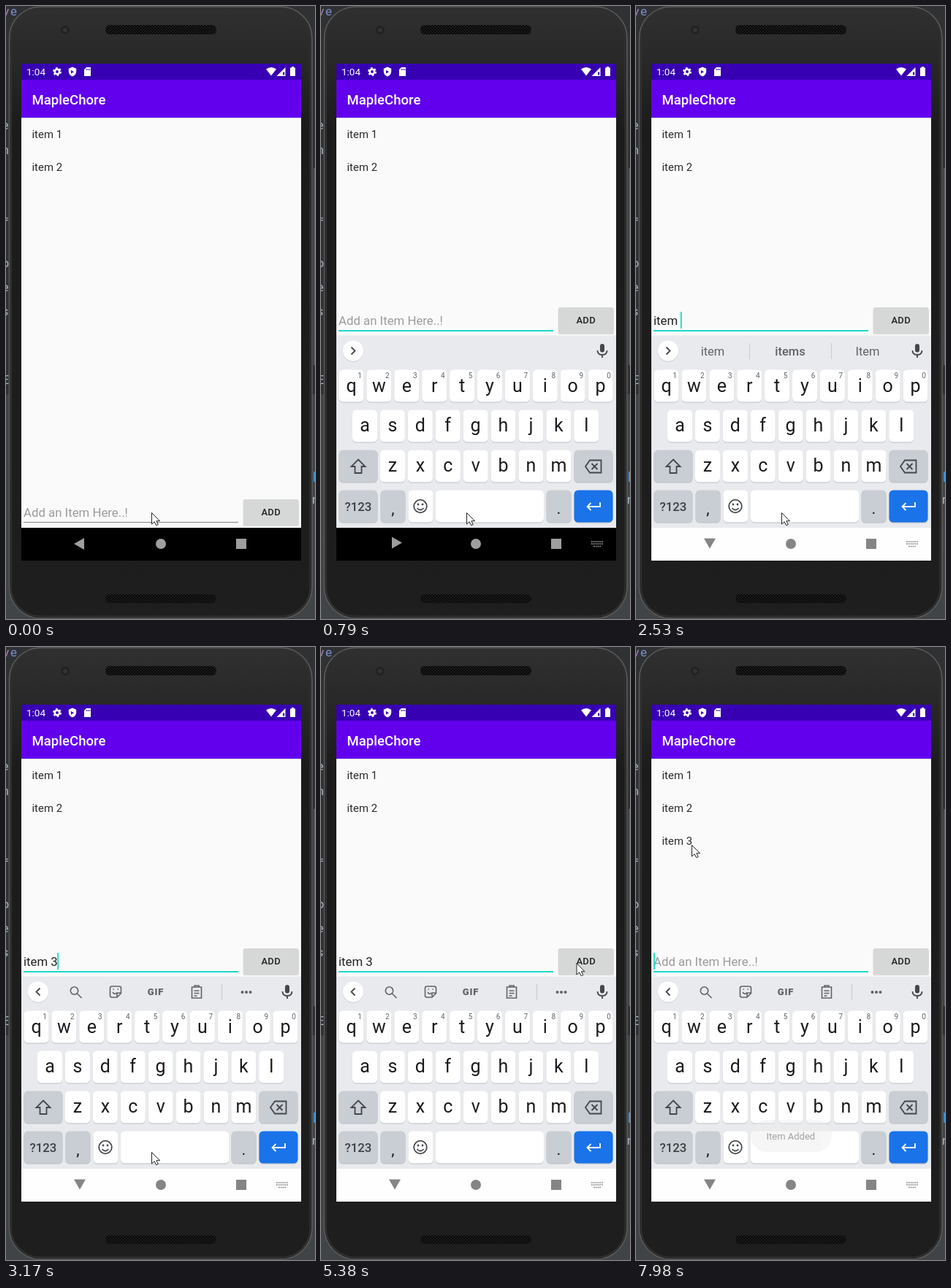
Recreate the animation shown at these times as an HTML page. Size 423x840 px, loop 8 s.

```html
<!DOCTYPE html>
<html lang="en">
<head>
<meta charset="utf-8">
<title>To-do list demo</title>
<style>
html, body { margin: 0; width: 100%; height: 100%; overflow: hidden; background: #2b2b2b; }
svg { display: block; width: 100vw; height: 100vh; }
text { font-family: Roboto, sans-serif; white-space: pre; }
.medium { font-weight: 500; }
.mid { text-anchor: middle; }
.line { fill: none; stroke: #44474b; stroke-width: 1.8; }
#tools { stroke: #5f6368; stroke-width: 1.6; }
.code { font: 17px "Noto Sans Mono", monospace; fill: #a9b7c6; }
</style>
</head>
<body>
<svg viewBox="0 0 423 840">
  <defs>
    <linearGradient id="shell" x2="0" y2="1">
      <stop offset="0" stop-color="#303030"/>
      <stop offset=".09" stop-color="#282828"/>
      <stop offset=".2" stop-color="#1b1b1b"/>
      <stop offset="1" stop-color="#1e1e1e"/>
    </linearGradient>
    <pattern id="mesh" width="4" height="4" patternUnits="userSpaceOnUse">
      <rect width="4" height="4" fill="#0d0d0d"/>
      <path d="M0 0h1v1h-1zM2 2h1v1h-1z" fill="#333"/>
    </pattern>
    <clipPath id="content"><path d="M21 153H404V715H21z"/></clipPath>
  </defs>

  <!-- desktop behind the phone -->
  <path d="M0 0H423V840H0z" fill="#2f3133"/>
  <path d="M0 532H423V840H0z" fill="#414446"/>
  <g id="code" class="code"></g>
  <path d="M421 638h2v14h-2z" fill="#3d8fd1"/>
  <path d="M421 222h2v270h-2z" fill="#55585a"/>

  <!-- phone -->
  <rect x="4.500" y="1" width="414.500" height="838" rx="43" fill="url(#shell)" stroke="#5c5c5c" stroke-width="1.500"/>
  <rect x="7" y="3.500" width="409.500" height="833" rx="40" fill="none" stroke="#303030" stroke-width="2"/>
  <circle cx="81" cy="33" r="6" fill="#222"/><circle cx="81" cy="33" r="3" fill="#333"/>
  <rect x="136" y="26" width="152" height="13" rx="6" fill="url(#mesh)"/>
  <rect x="136" y="806" width="152" height="12" rx="6" fill="url(#mesh)"/>

  <!-- bars -->
  <path d="M21 80H404V760H21z" fill="#fafafa"/>
  <path d="M21 79H404V101H21z" fill="#3700b3"/>
  <path d="M21 101H404V153H21z" fill="#6200ee"/>
  <path d="M21 153H404V154H21z" fill="#ddd"/>
  <g fill="#fff">
    <text x="28" y="95" font-size="13.500">1:04</text>
    <circle cx="70" cy="90" r="3.200" fill="none" stroke="#fff" stroke-width="2.600"/>
    <circle cx="70" cy="90" r="5" fill="none" stroke="#fff" stroke-width="2" stroke-dasharray="2.6 2.636"/>
    <path d="M91 83.5l5.2 2.2v4c0 3.400-2.200 5.600-5.200 6.800c-3-1.200-5.200-3.400-5.200-6.800v-4z"/>
    <path d="M89 88l4 2.200l-4 2.200z" fill="#3700b3"/>
    <path d="M110 84h6v12h-9v-9z"/>
    <path d="M110.500 86v2M112.500 86v2M114.500 86v2" stroke="#3700b3"/>
    <path d="M356 86.500q7-5 14 0l-7 9z"/>
    <path d="M382.500 84v12h-12z"/>
    <path d="M379 90.500h2.200v4h-2.200z" fill="#3700b3"/>
    <path d="M389 84.500h2v-1.500h3v1.500h2v11.500h-7z"/>
    <text x="35.500" y="134.500" font-size="18.600" class="medium">MapleChore</text>
  </g>

  <g font-size="14.900" fill="#2a2a2a">
    <text x="35.500" y="181">item 1</text>
    <text x="35.500" y="226">item 2</text>
    <text x="35.500" y="271" id="newItem">item 3</text>
  </g>

  <g id="entry">
    <text id="hint" x="24" y="700" font-size="16.800" fill="#9b9b9b">Add an Item Here..!</text>
    <text id="typed" x="24" y="700" font-size="16.800" fill="#212121"></text>
    <rect id="composing" x="24" y="701.500" height="1" fill="#333"/>
    <rect id="rule" x="24" width="294"/>
    <rect id="caret" y="682" width="1.800" height="23" fill="#1bd9c8"/>
    <rect x="324.500" y="677" width="76.500" height="36" rx="2" fill="#000" opacity=".13"/>
    <rect id="button" x="325" y="676" width="75" height="35" rx="2"/>
    <text x="362.700" y="697.500" font-size="13" letter-spacing=".3" fill="#222" class="medium mid">ADD</text>
  </g>

  <g clip-path="url(#content)">
    <g id="keyboard">
      <path d="M21 451.500H404V716H21z" fill="#e8eaed"/>
      <g id="keys"></g>
      <circle cx="44" cy="473.500" r="14.300" fill="#d3d5d8"/>
      <circle cx="44" cy="472.500" r="14" fill="#fff"/>
      <path id="chevron" class="line" d="M41.500 467.500l5 5l-5 5"/>
      <!-- microphone -->
      <rect x="382" y="463" width="6" height="11.500" rx="3" fill="#44474b"/>
      <path class="line" d="M378.500 472q0 6 6.500 6t6.500-6M385 478v4"/>
      <g id="words" font-size="16.500" fill="#5f6368">
        <path d="M155.500 462v22M267.500 462v22" stroke="#c9ccd0"/>
        <text class="mid" x="105" y="479"></text>
        <text class="mid medium" x="211" y="479"></text>
        <text class="mid" x="317" y="479"></text>
      </g>
      <g id="tools" class="line">
        <circle cx="93.500" cy="471" r="5.200"/><path d="M97.500 475l6 6"/>
        <path d="M145 465h10q2.500 0 2.500 2.500v7l-5.500 5.500h-7q-2.500 0-2.500-2.500v-10q0-2.500 2.500-2.500zM157 474h-5v5M146 473q2.500 4 5 1M146.500 469h1.500M152.500 469h1.500"/>
        <text class="mid" x="205" y="477" font-size="13" font-weight="900" letter-spacing=".8" fill="#5f6368" stroke="none">GIF</text>
        <path d="M254.500 466h13v15h-13zM258 466v-2h6v2zM257.500 471h7M257.500 474.500h7M257.500 478h4"/>
        <path d="M295.500 462v21" stroke="#cfd2d5"/>
        <path d="M323.500 473h.01M329 473h.01M334.500 473h.01" stroke-width="4" stroke-linecap="round"/>
      </g>
      <path class="line" d="M51 621.500l9.500 9.500h-5v9h-9v-9h-5z"/>
      <path class="line" d="M368 622.500h15.500v17H368l-6-8.500zM370.500 627l8 8M378.500 627l-8 8"/>
      <g class="line"><circle cx="136" cy="685.500" r="8.800"/><path d="M131.500 688q4.500 5 9 0"/></g>
      <circle cx="133" cy="683" r="1.400" fill="#44474b"/><circle cx="139" cy="683" r="1.400" fill="#44474b"/>
      <path class="line" d="M382 680v6h-17M369.500 681l-5 5l5 5" style="stroke:#fff"/>
    </g>
  </g>

  <path id="nav" d="M21 715H404V760H21z"/>
  <g id="navIcons">
    <path id="back" d="M93 737l14-8v16z"/>
    <circle cx="212" cy="737" r="7"/>
    <path d="M315 730h14v14h-14z"/>
    <path id="imeIcon" d="M370 734h16M370 737h16M373 740.500h10" fill="none" stroke-width="1.700" stroke-dasharray="1.800 1"/>
  </g>

  <g id="toast">
    <rect x="157" y="648" width="111" height="44" rx="22" fill="#ededed"/>
    <text x="178.500" y="675" font-size="13" fill="#303030">Item Added</text>
  </g>
  <path id="pointer" d="M0 0V15.500L3.600 12.200L6.200 17.200L8.800 16L6.400 11.200H11z" fill="#fff" stroke="#222" stroke-width="1"/>
</svg>

<script>
const $ = id => document.getElementById(id);
const LOOP = 8000, PITCH = 37.9;

// Keyboard
const GRAY = '#c9cdd4';
let keys = '';
function key(x, y, width, fill = '#fff', label = '', size = 25, dy = 30) {
  const cap = (top, color) =>
    `<rect x="${x - .5}" y="${top - .5}" width="${width + 1}" height="44" rx="5.5" fill="${color}"/>`;
  keys += cap(y + 1, '#bcc0c5') + cap(y, fill) +
    `<text class="mid" x="${x + width / 2}" y="${y + dy}" font-size="${size}" fill="#1b1b1d">${label}</text>`;
}
[['qwertyuiop', 25, 499, 30], ['asdfghjkl', 43.5, 554, 29], ['zxcvbnm', 81.5, 609, 29]].forEach(([letters, x, y, dy]) =>
  [...letters].forEach((letter, i) => key(x + i * PITCH, y, 33, '#fff', letter, 25, dy)));
for (let i = 0; i < 10; i++)
  keys += `<text class="mid" x="${53 + i * PITCH}" y="510" font-size="10" fill="#5f6368">${(i + 1) % 10}</text>`;
key(25, 609, 52, GRAY);
key(347, 609, 52, GRAY);
key(25, 664, 52, GRAY, '<tspan font-weight="500" fill="#3c4043">?123</tspan>', 16.8, 27.5);
key(82, 664, 33, GRAY, ',', 22, 32);
key(120, 664, 33);
key(157.5, 664, 147);
key(309, 664, 33, GRAY, '.', 22, 32);
key(347, 664, 52, '#1a73e8');
$('keys').innerHTML = keys;

// Code peeking out beside the phone
$('code').innerHTML = [
  ['-', 143], ['e', 169], ['n', 203], ['=', 298], ['o', 358], ['e', 391], ['s', 424], [')', 452, '#b5a642'], ['-', 492, '#cc7832'], ['E', 518]
].map(([c, y, fill = '#a9b7c6']) => `<text x="-5.5" y="${y}" style="fill:${fill}">${c}</text>`).join('') +
  '<text x="-4" y="13" style="fill:#b07fc4">v</text><text x="6" y="13" style="fill:#7c8fc9">e</text><text x="419" y="682">r</text>';

// Each track is a list of [start, value]; a value holds until the next start.
const at = (track, t) => track.findLast(([start]) => start <= t)[1];
const tracks = {
  typed: [[0, ''], [1180, 'i'], [1600, 'it'], [1880, 'ite'], [2130, 'item'], [2530, 'item '], [2770, 'item 3'], [5640, '']],
  composing: [[0, 0], [1460, 4], [1880, 9.5], [2130, 18], [2250, 33], [2530, 0]],
  caret: [[0, 0], [150, 1], [550, 0], [1180, 1], [3470, 0], [3870, 1], [4300, 0], [4700, 1], [5380, 0],
    [5640, 1], [6240, 0], [6700, 1], [7130, 0], [7620, 1]],
  slide: [[0, 264], [550, 140], [670, 24], [790, 0]],
  navLevel: [[0, 0], [910, 128], [1030, 235], [1180, 254]],
  back: [[0, [0, 0]], [670, [90, 2]], [790, [180, 3.5]], [910, [245, 1]], [1030, [270, 0]]], // angle, shift
  words: [[0, ''], [1600, "i|I|I'm"], [1880, "it|It|it's"], [2250, 'item|items|Item'], [2650, 'is|in|and'], [3170, '']],
  toast: [[0, 0], [5760, .2], [5880, .45], [6000, .7], [6120, .9], [6240, 1], [7860, .8], [7980, .45]],
  pointer: [[0, [199.5, 694.5]], [2770, [199.5, 692.5]], [4580, [214, 664]], [4700, [281, 548]], [4820, [337, 456]],
    [4940, [350, 433.5]], [6980, [232.5, 337.5]], [7130, [142, 296]], [7250, [88, 276]], [7370, [76.5, 271.5]]]
};
const show = (id, visible) => $(id).style.display = visible ? '' : 'none';
const set = (id, attributes) => Object.entries(attributes).forEach(([name, value]) => $(id).setAttribute(name, value));

function draw(t) {
  const now = {};
  for (const name in tracks) now[name] = at(tracks[name], t);
  const raised = t >= 550, focused = t >= 150, tools = t >= 3170;

  set('entry', { transform: `translate(0 ${raised ? -263 : 0})` });
  $('typed').textContent = now.typed;
  show('hint', !now.typed);
  set('composing', { width: now.composing });
  set('rule', focused ? { y: 707, height: 2, fill: '#1bd9c8' } : { y: 707, height: 1, fill: '#858585' });
  set('caret', { x: 24 + (now.typed ? $('typed').getComputedTextLength() - .5 : 0) });
  show('caret', now.caret);
  set('button', { fill: t >= 5520 && t < 5760 ? '#c6c7c7' : '#d6d7d7' });
  show('newItem', t >= 5640);

  show('keyboard', raised);
  set('keyboard', { transform: `translate(0 ${now.slide})` });
  set('chevron', { transform: tools ? 'rotate(180 44 472.5)' : '' });
  show('tools', tools);
  show('words', now.words);
  const words = now.words.split('|');
  $('words').querySelectorAll('text').forEach((el, i) => el.textContent = words[i] || '');

  const level = now.navLevel;
  set('nav', { fill: `rgb(${level},${level},${level})` });
  const iconColor = level > 200 ? '#858585' : '#9e9e9e';
  set('navIcons', { fill: iconColor });
  set('imeIcon', { stroke: iconColor });
  show('imeIcon', t >= 670);
  const [angle, shift] = now.back;
  set('back', { transform: `translate(${shift} 0) rotate(${angle} 100.25 736.25)` });

  set('toast', { opacity: now.toast });
  set('pointer', { transform: `translate(${now.pointer})` });
}

const begin = performance.now();
function tick() {
  draw((performance.now() - begin) % LOOP);
  requestAnimationFrame(tick);
}
tick();
</script>
</body>
</html>
```
